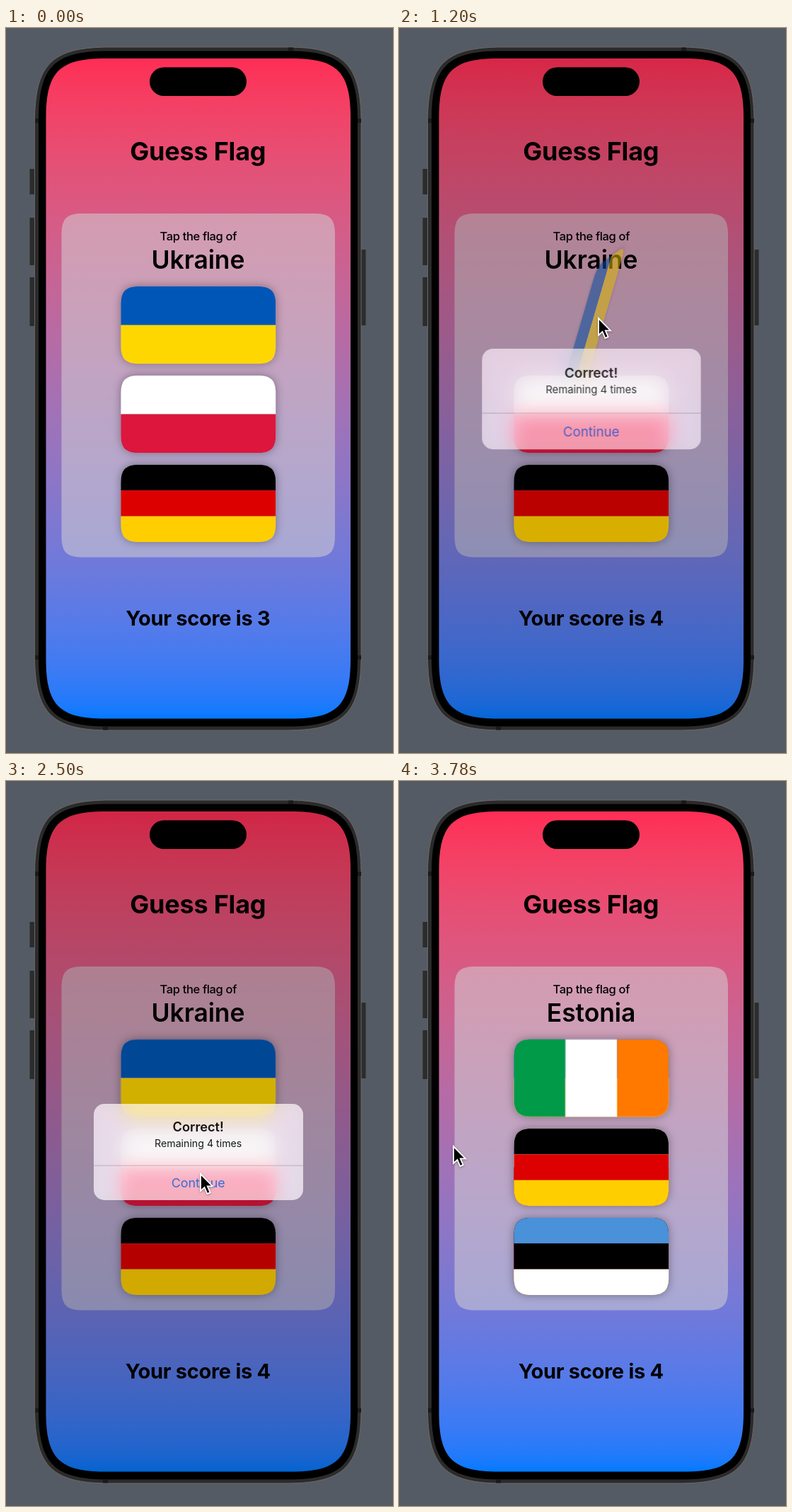
These frames come from a looping animation (547 by 1024 pixels, 3.96 s). An HTML page:

```html
<!DOCTYPE html>
<html lang="en">
<head>
<meta charset="utf-8">
<title>Guess Flag</title>
<style>
  html, body { margin: 0; width: 100%; height: 100%; overflow: hidden; background: #555b64; }
  svg { position: absolute; left: 0; top: 0; width: 100%; height: 100%; display: block; }
  text { font-family: Inter, "Liberation Sans", sans-serif; text-anchor: middle; }
  #alert {
    position: absolute; left: 124px; top: 455.5px; width: 295.5px; height: 135.5px;
    border-radius: 15px; overflow: hidden;
    background: rgba(252, 248, 250, .79);
    backdrop-filter: blur(13px) saturate(1.7) brightness(1.15);
  }
</style>
</head>
<body>
<svg id="stage" viewBox="0 0 547 1024">
  <defs>
    <linearGradient id="sky" x1="0" y1="0" x2="0" y2="1"></linearGradient>
    <filter id="shadow" x="-20%" y="-35%" width="140%" height="170%">
      <feDropShadow dx="0" dy="0" stdDeviation="6.5" flood-color="#000" flood-opacity=".36"/>
    </filter>
    <clipPath id="flagShape"><path id="flagPath"/></clipPath>
  </defs>
  <g id="phone"></g>
  <text x="271.3" y="187.3" font-size="36" font-weight="700" letter-spacing="-.2">Guess Flag</text>
  <text x="271.8" y="299.5" font-size="16.5" font-weight="500" letter-spacing="-.35">Tap the flag of</text>
  <text id="country" x="271.5" y="339.7" font-size="35.5" font-weight="600" letter-spacing="-.1"></text>
  <g id="flags"></g>
  <text id="score" x="271.3" y="843.5" font-size="29" font-weight="700" letter-spacing="-.3"></text>
  <path id="dim"/>
  <rect x="203" y="55.5" width="137" height="40.5" rx="20.2"/>
</svg>

<div id="alert">
  <svg viewBox="0 0 295.5 135.5">
    <text x="147.7" y="39" font-size="18.2" font-weight="600">Correct!</text>
    <text x="147.7" y="60.7" font-size="14.2">Remaining 4 times</text>
    <path d="M0 87.2H296" stroke="#3c3c43" stroke-opacity=".28"/>
    <text x="147.7" y="118.4" font-size="17.9" fill="#1c7bee">Continue</text>
  </svg>
</div>

<svg viewBox="0 0 547 1024">
  <path id="cursor" d="M0 0V24L5.5 19 9.4 28 13.6 26.2 9.8 17.3H17Z" stroke="#fff" stroke-width="1.8"
        style="filter: drop-shadow(0 1px 1.5px rgba(0, 0, 0, .35))"/>
</svg>

<script>
const LOOP = 3960;
const NS = 'http://www.w3.org/2000/svg';
const $ = id => document.getElementById(id);

function add(parent, tag, attrs) {
  const node = document.createElementNS(NS, tag);
  for (const key in attrs) node.setAttribute(key, attrs[key]);
  return parent.appendChild(node);
}

// Rectangle with continuous corners that blend gently into the sides.
function smoothRect(x, y, w, h, r) {
  const e = 1.4 * r, k = 0.315 * r, X = x + w, Y = y + h;
  return `M${x} ${y + e}C${x} ${y + k} ${x + k} ${y} ${x + e} ${y}` +
    `H${X - e}C${X - k} ${y} ${X} ${y + k} ${X} ${y + e}` +
    `V${Y - e}C${X} ${Y - k} ${X - k} ${Y} ${X - e} ${Y}` +
    `H${x + e}C${x + k} ${Y} ${x} ${Y - k} ${x} ${Y - e}Z`;
}

const SCREEN = smoothRect(56.5, 43, 430.5, 932.5, 60);

function buildPhone() {
  const phone = $('phone');
  const bar = (x, y, width, height, fill = '#2b2c2e') => add(phone, 'rect', { x, y, width, height, fill });
  const shape = (d, attrs) => add(phone, 'path', { d, ...attrs });

  for (const [x, y, h] of [[33, 199, 36], [33, 268, 67], [33, 352, 69], [502, 313, 107]]) {
    bar(x, y, 7, h);
    bar(x < 100 ? 33 : 508, y, 1, h, '#434446');
  }
  shape(smoothRect(40.5, 27, 461.5, 965, 76), { fill: '#2b2b2b', stroke: '#6c6865', 'stroke-width': 1 });
  for (const y of [128, 886]) {
    bar(41, y, 5, 6, '#1b1a1b');
    bar(497, y, 5, 6, '#1b1a1b');
  }
  bar(399, 27.5, 7, 5, '#1b1a1b');
  bar(137, 987, 7, 4.5, '#1b1a1b');
  shape(smoothRect(46, 32.5, 451, 954, 70), {});

  for (let i = 0; i <= 12; i++) {
    const share = i / 12 * 100;
    add($('sky'), 'stop', {
      offset: share + '%',
      style: `stop-color: color-mix(in oklab, #007aff ${share}%, #ff2d55)`
    });
  }
  shape(SCREEN, { fill: 'url(#sky)' });
  shape(smoothRect(78.5, 262, 386.5, 485.5, 22), { fill: '#d3d0d3', 'fill-opacity': .55 });
  $('dim').setAttribute('d', SCREEN);
}

const FLAG_W = 219, FLAG_H = 109.3;
const FLAGS = {
  ukraine: { bands: ['#0057b7', '#ffd700'] },
  poland: { bands: ['#fff', '#dc143c'] },
  germany: { bands: ['#000', '#d00', '#ffce00'] },
  ireland: { bands: ['#009a49', '#fff', '#ff7900'], upright: true },
  estonia: { bands: ['#4891d9', '#000', '#fff'] }
};

function drawFlag(parent, { bands, upright }) {
  const group = add(parent, 'g', { 'clip-path': 'url(#flagShape)' });
  const w = upright ? FLAG_W / bands.length : FLAG_W;
  const h = upright ? FLAG_H : FLAG_H / bands.length;
  bands.forEach((fill, i) => add(group, 'rect', {
    x: -FLAG_W / 2 + (upright ? i * w : 0),
    y: -FLAG_H / 2 + (upright ? 0 : i * h),
    width: w, height: h, fill
  }));
  return group;
}

function buildSlot([before, after], i) {
  const place = add($('flags'), 'g', { transform: `translate(271.8 ${419.6 + 125.9 * i})` });
  const node = add(place, 'g', { filter: 'url(#shadow)' });
  drawFlag(node, FLAGS[before]);
  return { node, next: drawFlag(node, FLAGS[after]) };
}

buildPhone();
$('flagPath').setAttribute('d', smoothRect(-FLAG_W / 2, -FLAG_H / 2, FLAG_W, FLAG_H, 20));
const slots = [['ukraine', 'ireland'], ['poland', 'germany'], ['germany', 'estonia']].map(buildSlot);

const clamp = v => Math.min(1, Math.max(0, v));
const ease = v => v * v * (3 - 2 * v);

// Critically damped spring from 0 to 1; dt in ms.
function spring(dt, speed) {
  const x = Math.max(0, dt) * speed / 1000;
  return 1 - (1 + x) * Math.exp(-x);
}

// Flat projection of a turn about the diagonal axis (1, 1, 1).
function diagonalTurn(degrees) {
  const a = degrees * Math.PI / 180, c = Math.cos(a), s = Math.sin(a) / Math.sqrt(3);
  const k = (1 - c) / 3;
  return `matrix(${c + k} ${k + s} ${k - s} ${c + k} 0 0)`;
}

// time, x, y
const CURSOR = [
  [400, 60, 520], [900, 282, 410], [1400, 282, 410], [1900, 294, 461],
  [2250, 275, 555], [2550, 275, 555], [2900, 79, 516], [3780, 77, 516]
];

function cursorAt(t) {
  const i = CURSOR.findIndex(key => key[0] >= t);
  const [t1, x1, y1] = CURSOR[i], [t0, x0, y0] = CURSOR[Math.max(0, i - 1)];
  const p = t1 > t0 ? ease((t - t0) / (t1 - t0)) : 1;
  return [x0 + (x1 - x0) * p, y0 + (y1 - y0) * p];
}

function render(t) {
  const spin = spring(t - 1062, 10.5);
  const shown = spring(t - 1077, 23);
  const gone = t < 2850 ? spring(t - 2466, 15.7) : 1;
  const alertOpacity = shown * (1 - gone);
  const swap = ease(clamp((t - 2880) / 350));

  $('country').textContent = t < 2850 ? 'Ukraine' : 'Estonia';
  $('score').textContent = 'Your score is ' + (t < 1062 ? 3 : 4);

  slots[0].node.setAttribute('transform', diagonalTurn(360 * spin));
  slots[0].node.setAttribute('opacity', t < 1000 ? 1 : 0.2 + 0.8 * spin);
  for (const slot of slots) slot.next.setAttribute('opacity', swap);

  $('dim').setAttribute('fill-opacity', 0.2 * alertOpacity);
  const alert = $('alert').style;
  alert.visibility = alertOpacity > 0 ? 'visible' : 'hidden';
  alert.opacity = alertOpacity;
  alert.transform = `scale(${1.2 - 0.2 * shown})`;

  $('cursor').setAttribute('visibility', t < CURSOR[0][0] ? 'hidden' : 'visible');
  $('cursor').setAttribute('transform', `translate(${cursorAt(t)})`);
}

// The picture advances ten times a second, with one longer hold near the end.
const stepTime = t => t >= 3780 ? 3780 : Math.min(3600, Math.floor(t / 100) * 100);

const start = performance.now();
function tick() {
  render(stepTime((performance.now() - start) % LOOP));
  requestAnimationFrame(tick);
}
tick();
</script>
</body>
</html>
```
